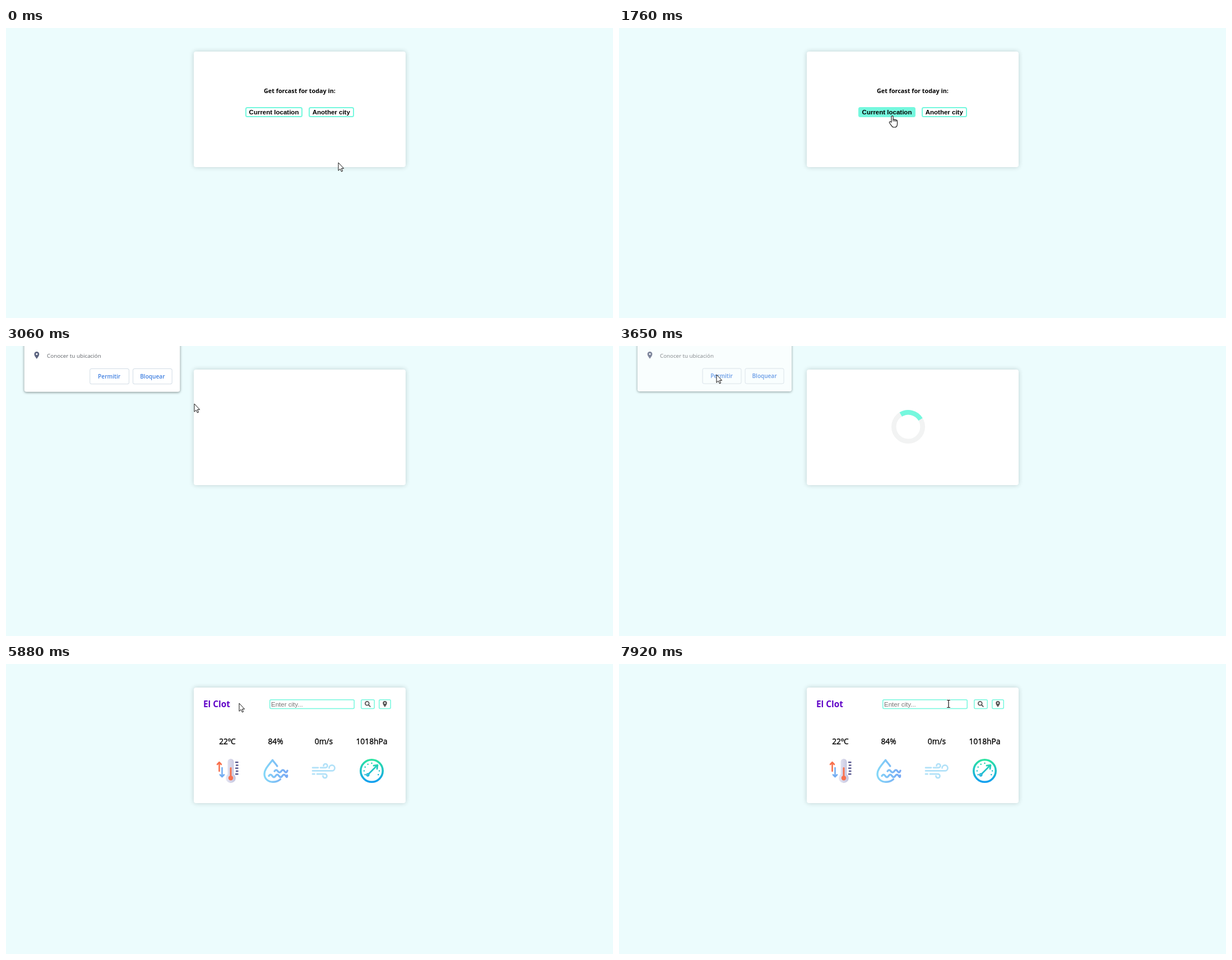
An HTML page for the animation above (8 s loop, 1083 px wide and 517 px high).

```html
<!DOCTYPE html>
<html lang="en">
<head>
<meta charset="utf-8">
<title>Weather card</title>
<style>
  html, body { margin: 0; width: 100%; height: 100%; overflow: hidden; background: #ecfcfd; }
  #card, #popup, svg { position: absolute; }
  #card { left: 335px; top: 42px; width: 378px; height: 206px; border-radius: 4px;
    background: #fff; box-shadow: 0 0 8px rgba(0, 30, 30, .2); }
  #popup { left: 33px; top: -60px; width: 275px; height: 141px; border-radius: 4px;
    transform-origin: 39px 60px; }
  svg { left: 0; top: 0; }
  text { font-family: "Open Sans", "Noto Sans", sans-serif; }
  .arial { font: 11.5px "Liberation Sans", Arial, sans-serif; }
  .bold { font-weight: 700; }
  .mid { text-anchor: middle; }
  .box { fill: #fff; stroke: #75f8de; stroke-width: 2; }
  .thin { stroke-width: 1.5; }
  .value { font-size: 13.8px; text-anchor: middle; stroke: #000; stroke-width: .35; }
  .line { fill: none; stroke-linecap: round; stroke-linejoin: round; }
</style>
</head>
<body>
<div id="card"></div>
<div id="popup"></div>
<svg width="1083" height="517" viewBox="0 0 1083 517">
  <defs>
    <linearGradient id="drop" gradientUnits="userSpaceOnUse" x1="459" y1="0" x2="503" y2="0">
      <stop offset="0" stop-color="#85d9f8"/><stop offset="1" stop-color="#78a8f4"/>
    </linearGradient>
    <linearGradient id="gauge" gradientUnits="userSpaceOnUse" x1="0" y1="169" x2="0" y2="212">
      <stop offset="0" stop-color="#2ee6a0"/><stop offset="1" stop-color="#129df2"/>
    </linearGradient>
    <linearGradient id="glass" x1="0" x2="1">
      <stop offset="0" stop-color="#e6e6f3"/><stop offset="1" stop-color="#c3c3de"/>
    </linearGradient>
    <path id="pin" d="M0 6.5C-2 3.4-4.4 1-4.4-2A4.4 4.4 0 0 1 4.4-2C4.4 1 2 3.4 0 6.5Z
      M0-3.6A1.6 1.6 0 1 0 0-.4A1.6 1.6 0 1 0 0-3.6Z" fill-rule="evenodd"/>
    <path id="stem" d="M-2.5-6.5H2.5M0-6.5V6.5M-2.5 6.5H2.5"/>
  </defs>

  <g id="start">
    <text class="bold mid" x="524" y="116" font-size="10.8">Get forcast for today in:</text>
    <rect id="here" class="box" x="428" y="142" width="100" height="16" rx="2.5"/>
    <rect class="box" x="541" y="142" width="79" height="16" rx="2.5"/>
    <text class="arial bold mid" x="478" y="154">Current location</text>
    <text class="arial bold mid" x="580.3" y="154">Another city</text>
  </g>

  <g id="spinner" fill="none" stroke-width="8.6">
    <circle cx="516" cy="144" r="25.7" stroke="#f2f3f3"/>
    <path id="arc" stroke="#75f8de" d="M497.83 125.83A25.7 25.7 0 0 1 534.17 125.83"/>
  </g>

  <g id="ask">
    <g font-size="9.75" fill="#5f6368">
      <text x="49" y="-2">http://127.0.0.1:5500 quiere</text>
      <text x="73" y="20.5">Conocer tu ubicación</text>
      <use href="#pin" x="55" y="16.3" fill="#5c6480"/>
    </g>
    <g fill="none" stroke="#d3dde6">
      <rect x="149" y="40" width="69" height="27" rx="3"/>
      <rect x="225" y="40" width="69" height="27" rx="3"/>
    </g>
    <g class="mid" font-size="10" font-weight="600" fill="#3f7fe0">
      <text x="183" y="57">Permitir</text>
      <text x="259.5" y="57">Bloquear</text>
    </g>
  </g>

  <g id="data">
    <text class="bold" x="352" y="76.5" font-size="15.4" fill="#6206c8">El Clot</text>
    <rect class="box thin" x="470.8" y="63.8" width="150.4" height="15.8" rx="2"/>
    <rect id="search" class="box thin" x="633.8" y="63.8" width="23.4" height="15.8" rx="2"/>
    <rect class="box thin" x="665.8" y="63.8" width="20.4" height="15.8" rx="2"/>
    <text class="arial" x="473" y="76" fill="#757575">Enter city...</text>
    <rect id="caret" x="473" y="65" width="1" height="13"/>
    <g class="line" stroke="#555" stroke-width="1.8">
      <circle cx="644.3" cy="70.3" r="3.4"/><path d="M647 73L649.8 75.8"/>
    </g>
    <use href="#pin" transform="translate(676 71.4) scale(.85)" fill="#555"/>
    <text class="value" x="395" y="143.3">22ºC</text>
    <text class="value" x="481" y="143.3">84%</text>
    <text class="value" x="567" y="143.3">0m/s</text>
    <text class="value" x="652.5" y="143.3">1018hPa</text>

    <g class="line" stroke-width="2.6">
      <path stroke="#f8714e" d="M380.5 191V176M377 179L380.5 175.2L384 179"/>
      <path stroke="#73adf2" d="M385.5 185V200M382 197.5L385.5 201.2L389 197.5"/>
    </g>
    <path fill="url(#glass)" d="M395.5 174.5a5.5 5.5 0 0 1 11 0V196.5a8.8 8.8 0 1 1 -11 0Z"/>
    <path class="line" stroke="#f8714e" stroke-width="3" d="M401 185.5V203"/>
    <circle cx="401" cy="203.3" r="4.2" fill="#f8714e"/>
    <path id="scale" stroke="#58588f" stroke-width="2.4"/>

    <g class="line" stroke="url(#drop)" stroke-width="3.4">
      <path d="M489.5 205.5C485.5 209 481 210.3 476 210.3C467 210.3 461 204 461 196C461 188 468 181 475.5 171.2C478.5 175.5 481.5 178.5 483.8 182"/>
      <path d="M479 191.2q3-4.4 6 0t6 0t6 0t5-1"/>
      <path d="M469 199.5q3-4.4 6 0t6 0t6 0t6 0t6 0t2.5-1"/>
    </g>

    <g class="line" stroke="#b1e1f8" stroke-width="2.7">
      <path d="M547 184.8H557M561 184.8H570a3.4 3.4 0 1 0 -3.4-3.4"/>
      <path d="M547 190.4H581.5a5 5 0 1 0 -5-5"/>
      <path d="M547 196.2H550.5M555 196.2H569a3.5 3.5 0 1 1 -3.5 3.5"/>
    </g>

    <g class="line" stroke="url(#gauge)">
      <circle cx="652.5" cy="190.5" r="19.7" stroke-width="3.6"/>
      <path stroke-width="2.8" d="M647 196L662 181M656 181.2L663 180.2L662 187"/>
      <circle cx="645.5" cy="197.6" r="1.9" stroke-width="2.4"/>
      <path id="dots" stroke-width="2.6"/>
    </g>
  </g>

  <g id="arrow" fill="#fff" stroke="#111" stroke-linejoin="round">
    <path d="M1 1V15.3L4.2 12.2L6.5 17L8.6 16L6.4 11.3H10.6Z"/>
  </g>
  <g id="hand" fill="#fff" stroke="#111" stroke-width="1.1" stroke-linejoin="round">
    <path d="M-1 12V2.2a1.6 1.6 0 0 1 3.2 0V7.6a1.35 1.35 0 0 1 2.6.3a1.35 1.35 0 0 1 2.5.6a1.3 1.3 0 0 1 2.2 1V15c0 3.6-1.8 6-4.6 6H3.3c-2 0-3-.9-4-2.6L-4.5 13c-1-1.7 1.2-2.8 2.2-1.7Z"/>
    <path fill="none" d="M2.2 7.5v3M4.8 8v2.8M7.3 8.7v2.3"/>
  </g>
  <g id="beam" class="line">
    <use href="#stem" stroke="#fff" stroke-width="2.6"/>
    <use href="#stem" stroke="#111" stroke-width="1.2"/>
  </g>
</svg>
<script>
const LOOP = 8000, STEP = 68;
const HIDE_START = 2170, SPIN = 3650, FREEZE = 4680, RESULT = 5010;

const $ = id => document.getElementById(id);
const show = (id, on) => $(id).style.display = on ? '' : 'none';
const clamp = v => Math.min(1, Math.max(0, v));
const easeOut = p => 1 - (1 - p) ** 1.7;
const mix = (a, b, p) => a + (b - a) * p;
const inside = ([x, y], l, t, r, b) => x >= l && x <= r && y >= t && y <= b;

// The pointer rests between glides; each glide sets off from the last stop.
const rest = [592, 239];
const glides = [
  { from: 730, until: 1150, to: [514, 191] },
  { from: 1410, until: 1970, to: [482, 149] },
  { from: 2850, until: 3650, to: [170, 49] },
  { from: 3720, until: 4400, to: [183, 64] },
  { from: 5530, until: 5880, to: [415, 69] },
  { from: 6280, until: 6760, to: [657, 68] },
  { from: 6760, until: 7110, to: [588, 70.5] }
];

function pointer(t) {
  let pos = rest;
  for (const { from, until, to } of glides) {
    if (t < from) break;
    const done = (Math.floor((t - from) / STEP) + 1) * STEP;
    const p = easeOut(clamp(done / (until - from + STEP)));
    pos = pos.map((v, i) => mix(v, to[i], p));
  }
  return pos;
}

function drawPopup(t) {
  const grow = clamp((t - 2310) / 260), fade = clamp((t - 3600) / 180);
  const alpha = grow * (1 - fade);
  const scale = .935 + .075 * grow - .035 * fade;
  const box = $('popup').style, ask = $('ask');
  show('popup', alpha > 0);
  show('ask', alpha > 0);
  box.transform = `scale(${scale})`;
  box.background = `rgba(255,255,255,${alpha})`;
  box.boxShadow = `0 1px 4px rgba(0,20,20,${.5 * Math.sqrt(alpha)})`;
  ask.setAttribute('opacity', alpha ** .7);
  ask.setAttribute('transform', `translate(72 0) scale(${scale}) translate(-72 0)`);
}

function drawSpinner(t) {
  show('spinner', t >= SPIN && t < RESULT);
  const steps = Math.floor((Math.min(t, FREEZE) - SPIN) / STEP);
  $('arc').setAttribute('transform', `rotate(${14 + steps * 11.2} 516 144)`);
}

function draw(t) {
  const start = t < HIDE_START, data = t >= RESULT;
  const pos = pointer(t);
  const overHere = start && inside(pos, 427, 141, 529, 159);
  const overSearch = data && inside(pos, 633, 63, 658, 80);
  const overInput = data && inside(pos, 470, 63, 622, 80);

  show('start', start);
  show('data', data);
  show('caret', t >= 7400 && t < 7920);
  $('here').style.fill = overHere ? '#75f8de' : '';
  $('search').style.fill = overSearch ? '#75f8de' : '';
  drawSpinner(t);
  drawPopup(t);

  const shape = overHere || overSearch ? 'hand' : overInput ? 'beam' : 'arrow';
  for (const id of ['arrow', 'hand', 'beam']) show(id, id === shape);
  $(shape).setAttribute('transform', `translate(${pos.map(Math.round).join(' ')})`);
}

// Thermometer marks: every other one is longer
let marks = '';
for (let i = 0; i < 5; i++) marks += `M${409 + i % 2} ${175.2 + i * 5.25}H414.5`;
$('scale').setAttribute('d', marks);

// Gauge dots, leaving room for the needle
let dots = '';
for (let deg = -120; deg <= 120; deg += 30) {
  if (Math.abs(deg - 45) < 20) continue;
  const a = deg * Math.PI / 180;
  dots += `M${652.5 + 13.6 * Math.sin(a)} ${190.5 - 13.6 * Math.cos(a)}h.01`;
}
$('dots').setAttribute('d', dots);

const began = performance.now();
function tick() {
  draw((performance.now() - began) % LOOP);
  requestAnimationFrame(tick);
}
tick();
</script>
</body>
</html>
```
